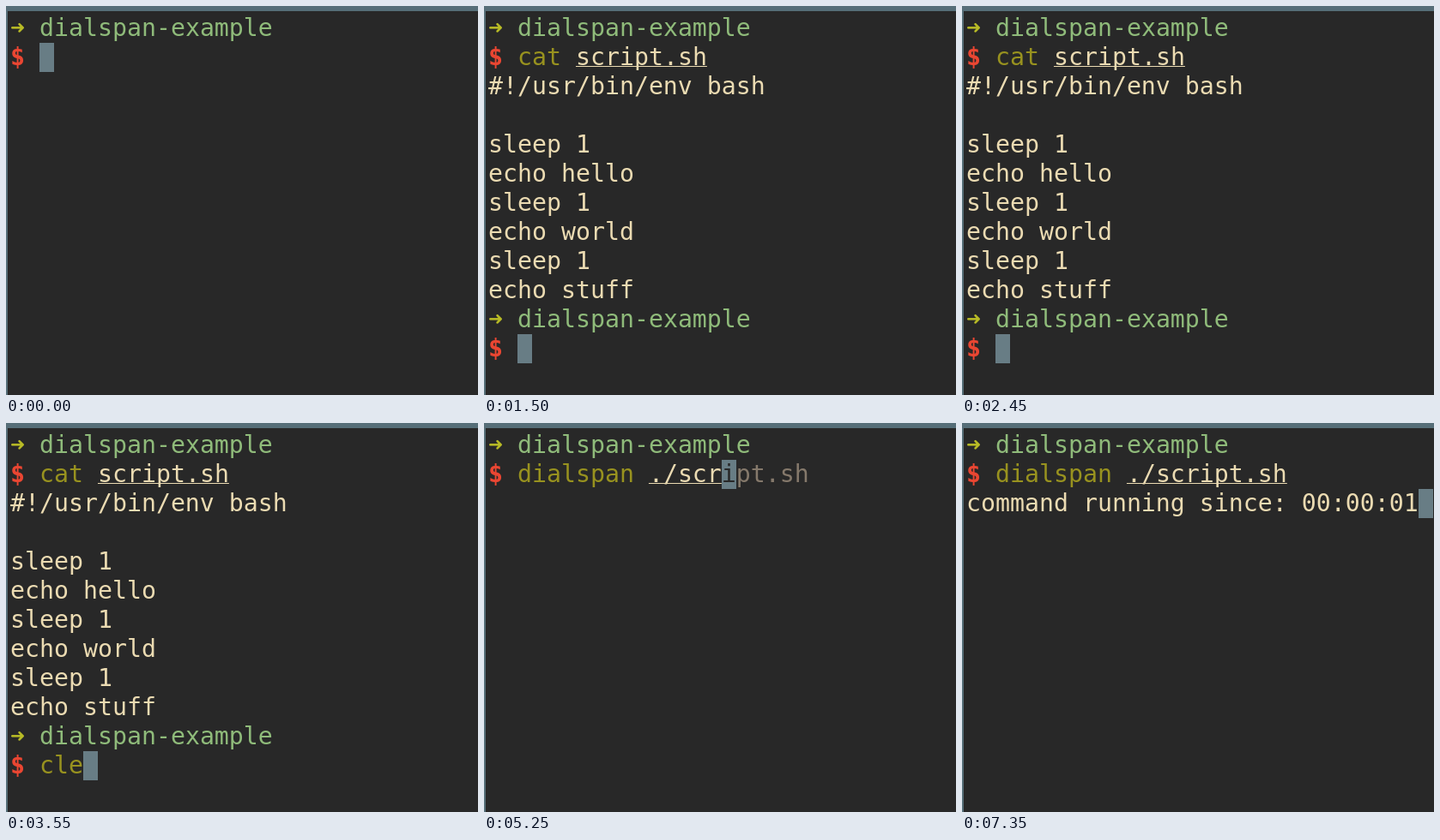
An HTML page that plays this animation: 550 by 454 pixels, repeating every 8000 ms.

```html
<!DOCTYPE html>
<html lang="en">
<head>
<meta charset="utf-8">
<title>Terminal session</title>
<style>
  html, body { margin: 0; width: 100%; height: 100%; overflow: hidden; background: #282828; }
  #stage { position: relative; width: 550px; height: 454px; overflow: hidden; background: #282828; }
  .edge { position: absolute; left: 0; top: 0; background: #566e78; }
  .top { width: 550px; height: 6px; }
  .left { width: 2px; height: 454px; }
  #cursor { position: absolute; width: 17px; height: 34px; background: #687d85; }
  #text {
    position: absolute; left: 5px; top: 9px; margin: 0;
    font: 28.237px/34px "DejaVu Sans Mono", monospace;
    color: #ebdbb2; white-space: pre;
  }
  .row { height: 34px; }
  .arrow { color: #b8bb26; }
  .dir { color: #8fbb7a; }
  .dollar { color: #ea4632; font-weight: bold; }
  .cmd { color: #98921f; }
  .path { text-decoration: underline 1px; text-underline-offset: 1px; text-decoration-skip-ink: none; }
  .hint { color: #85796b; }
  .under { color: #282828; }
</style>
</head>
<body>
<div id="stage">
  <div class="edge top"></div>
  <div class="edge left"></div>
  <div id="cursor"></div>
  <div id="text"></div>
</div>
<script>
const LOOP = 8000, CELL_W = 17, CELL_H = 34, LEFT = 5, TOP = 9;
const TOOL = "dialspan";
const CAT = "cat script.sh", CLEAR = "clear", RUN = TOOL + " ./script.sh";
const LISTING = ["#!/usr/bin/env bash", "",
  ...["hello", "world", "stuff"].flatMap(word => ["sleep 1", "echo " + word])];

const textBox = document.getElementById("text");
const cursorBox = document.getElementById("cursor");

const span = (cls, s) => s ? `<span class="${cls}">${s}</span>` : "";
const typed = (t, start, step, cmd) =>
  Math.max(0, Math.min(cmd.length, Math.floor((t - start) / step) + 1));

// Prompt lines with the first n letters of cmd; a longer hint trails the cursor.
function prompt(cmd, n, hint = "") {
  const done = cmd.slice(0, n), gap = done.indexOf(" ");
  const cut = gap < 0 ? n : gap + 1;
  const rest = hint.slice(n);
  return [
    span("arrow", "➜") + " " + span("dir", TOOL + "-example"),
    span("dollar", "$") + " " + span("cmd", done.slice(0, cut)) + span("path", done.slice(cut)) +
      span("under", rest.slice(0, 1)) + span("hint", rest.slice(1))
  ];
}

function screen(t) {
  if (t < 1250) {
    const n = typed(t, 60, 60, CAT);
    return { rows: prompt(CAT, n), col: n + 2, row: 1 };
  }
  if (t < 4120) {
    const n = typed(t, 3250, 120, CLEAR);
    const rows = [...prompt(CAT, CAT.length), ...LISTING, ...prompt(CLEAR, n, n === 1 ? CAT : "")];
    return { rows, col: n + 2, row: rows.length - 1 };
  }
  if (t < 5950) {
    const n = t < 4500 ? typed(t, 4400, 100, "d") : 1 + typed(t, 4500, 60, RUN.slice(1));
    const hint = n === 1 ? "docs" : n > 1 ? RUN : "";
    return { rows: prompt(RUN, n, hint), col: n + 2, row: 1 };
  }
  const rows = prompt(RUN, RUN.length);
  if (t < 6000) return { rows, col: 0, row: 2 };
  const seconds = String(Math.floor((t - 6000) / 1000)).padStart(2, "0");
  const status = "command running since: 00:00:" + seconds;
  return { rows: [...rows, status], col: status.length, row: 2 };
}

let shown = "";
function draw(now) {
  const { rows, col, row } = screen(now % LOOP);
  const html = rows.map(r => `<div class="row">${r}</div>`).join("");
  if (html !== shown) textBox.innerHTML = shown = html;
  cursorBox.style.left = LEFT + col * CELL_W + "px";
  cursorBox.style.top = TOP + row * CELL_H + "px";
}

const begin = performance.now();
function tick() {
  draw(performance.now() - begin);
  requestAnimationFrame(tick);
}
tick();
</script>
</body>
</html>
```
